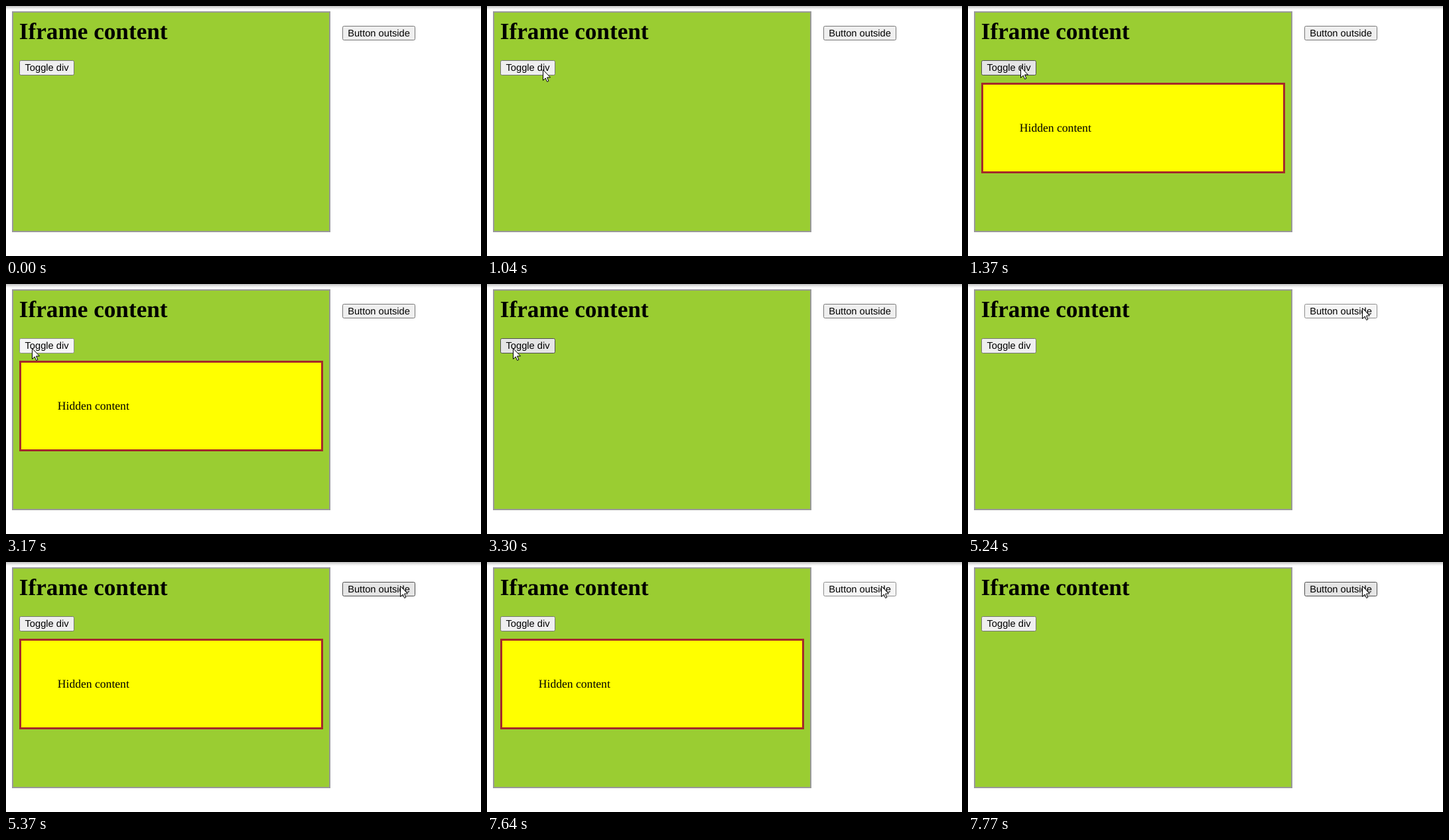
Animation, 716 px wide and 378 px high, one loop 8 s. Source, as an HTML page:

```html
<!DOCTYPE html>
<html lang="en">
<head>
<meta charset="utf-8">
<title>Toggle div</title>
<style>
  html, body { margin: 0; width: 100%; height: 100%; overflow: hidden; background: #fff; }
  svg { display: block; }
  text { text-rendering: geometricPrecision; }
  .serif { font-family: "Liberation Serif", serif; }
  .button text { font: 14.667px "Liberation Sans", sans-serif; text-anchor: middle; }
  .button rect { fill: #efefef; stroke: #767676; }
  .button.hover rect { fill: #e5e5e5; stroke: #4f4f4f; }
  .button.active rect { fill: #f5f5f5; stroke: #8d8d8d; }
</style>
</head>
<body>
<svg width="716" height="378" viewBox="0 0 716 378">
  <defs>
    <linearGradient id="shade" x2="0" y2="1">
      <stop stop-color="#bbb"/>
      <stop offset=".5" stop-color="#e6e6e6"/>
      <stop offset="1" stop-color="#fff"/>
    </linearGradient>
  </defs>
  <rect width="716" height="6" fill="url(#shade)"/>
  <rect x="10" y="9" width="478" height="332" fill="#9acd32" stroke="#999" stroke-width="2"/>
  <text class="serif" x="19.8" y="50" font-size="35.2" font-weight="bold">Iframe content</text>
  <g id="hidden">
    <rect x="21.5" y="117.5" width="455" height="134" fill="#ff0" stroke="#a52a2a" stroke-width="3"/>
    <text class="serif" x="77.8" y="190" font-size="17.6">Hidden content</text>
  </g>
  <g id="inside" class="button">
    <rect x="20.5" y="82.5" width="82" height="22" rx="2"/>
    <text x="61.5" y="98">Toggle div</text>
  </g>
  <g id="outside" class="button">
    <rect x="507.5" y="30.5" width="109" height="21" rx="2"/>
    <text x="562" y="46">Button outside</text>
  </g>
  <path id="cursor" d="M.5.5V16.5L4.2 13 6.6 18.5 8.9 17.5 6.5 12H11.5Z" fill="#fff" stroke="#000"/>
</svg>
<script>
const LOOP = 8000, STEP = 67;
const $ = id => document.getElementById(id);

// Pointer moves in discrete steps; bow bends the path vertically.
const moves = [
  { start: 500, end: 1100, steps: 10, from: [353, 310], to: [79, 92], bow: 0 },
  { start: 2240, end: 2300, steps: 2, from: [79, 92], to: [39, 97], bow: 0 },
  { start: 4170, end: 4700, steps: 9, from: [39, 97], to: [594, 36], bow: -5.6 }
];
// Press and release times; every release toggles the hidden box.
const clicks = [[1300, 1370], [3170, 3300], [5240, 5370], [7640, 7770]];
const buttons = [
  { el: $('inside'), box: [20, 82, 103, 105] },
  { el: $('outside'), box: [507, 30, 617, 52] }
];

const ease = u => 1.067 * u + 0.866 * u * u - 0.933 * u ** 3;

function pointer(t) {
  const move = moves.findLast(m => t >= m.start);
  if (!move) return null;
  const { start, end, steps, from, to, bow } = move;
  const index = Math.floor((t - start) / (end - start) * (steps - 1) + 1e-6);
  const u = Math.min(1, (index + 1) / steps), p = ease(u);
  return [
    Math.round(from[0] + (to[0] - from[0]) * p),
    Math.round(from[1] + (to[1] - from[1]) * p + bow * 4 * u * (1 - u))
  ];
}

const contains = ([l, t, r, b], [x, y]) => x >= l && x < r && y >= t && y < b;

function draw(t) {
  const pos = pointer(t), lagged = pointer(t - STEP);
  const pressed = clicks.some(([down, up]) => t >= down && t < up);
  const toggles = clicks.filter(([, up]) => t >= up).length;
  $('cursor').style.display = pos ? '' : 'none';
  if (pos) $('cursor').setAttribute('transform', `translate(${pos})`);
  $('hidden').style.display = toggles % 2 ? '' : 'none';
  // Hover styling trails the pointer by one step.
  for (const { el, box } of buttons) {
    const hover = lagged && contains(box, lagged);
    el.setAttribute('class', 'button' + (hover ? pressed ? ' active' : ' hover' : ''));
  }
}

const origin = performance.now();
function tick() {
  draw((performance.now() - origin) % LOOP);
  requestAnimationFrame(tick);
}
tick();
</script>
</body>
</html>
```
